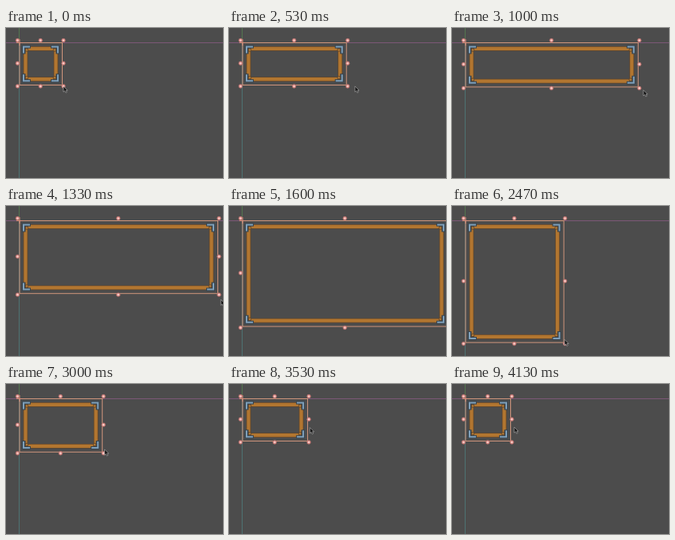
Write an HTML page that moves like this. It is 272 by 188 pixels and loops after 4270 ms.

```html
<!DOCTYPE html>
<html lang="en">
<head>
<meta charset="utf-8">
<title>Resizing a bordered panel</title>
<style>
html, body { margin: 0; width: 100%; height: 100%; overflow: hidden; background: #4c4c4c; }
svg { display: block; width: 100vw; height: 100vh; }
</style>
</head>
<body>
<svg viewBox="0 0 272 188">
  <defs>
    <g id="corner">
      <path d="M0 0H11V4H8L4.5 8V11H0Z" fill="#35434f"/>
      <path d="M1 1H10V3H3V10H1Z" fill="#7f9fb8"/>
      <path d="M4 4H8L4 8Z" fill="#6b4f35"/>
      <circle cx="6" cy="6" r="1.8" fill="#b07a38" stroke="#5a4029" stroke-width=".8"/>
    </g>
    <g id="handle">
      <circle r="2.4" fill="#e2918c" stroke="#a06260" stroke-width=".5"/>
      <circle r="1.1" fill="#f6d8d2"/>
    </g>
  </defs>
  <rect width="272" height="188" fill="#4c4c4c"/>
  <path d="M0 18.5H272" stroke="#7c5877"/>
  <path d="M16.5 0V18" stroke="#54754f"/>
  <path d="M16.5 18V188" stroke="#4e7273"/>
  <g fill="none">
    <rect class="band" x="24.5" y="25.8" rx="3.5" stroke="#62462a" stroke-width="5.8"/>
    <rect class="band" x="24.5" y="25.8" rx="3.5" stroke="#b27630" stroke-width="4.2"/>
  </g>
  <g id="corners"></g>
  <rect id="selection" x="17" y="18.5" fill="none" stroke="#d0957c"/>
  <path d="M13 18.5H21M17 14V22" stroke="#d98f7c"/>
  <g id="handles"></g>
  <path id="cursor" d="M0 0V7.2L1.7 5.7L2.9 8.2L4.3 7.5L3.1 5.2H5.2Z" fill="#161616" stroke="#b5b5b5" stroke-width=".6"/>
</svg>
<script>
const LOOP = 4270, STEP = 200 / 3, LAST_CHANGE = 4130, LEAD = 40;
const LEFT = 14.5, TOP = 15.5;

const $ = id => document.getElementById(id);
const ramp = (t, from, to) => Math.min(1, Math.max(0, (t - from) / (to - from)));
const easeOut = u => u * (2 - u);
const smooth = u => u * u * (3 - 2 * u);

function setAll(node, attributes) {
  for (const name in attributes) node.setAttribute(name, attributes[name]);
}

function place(node, x, y, flipX = 1, flipY = 1) {
  node.setAttribute("transform", `translate(${x} ${y}) scale(${flipX} ${flipY})`);
}

function copies(count, symbol, parent) {
  return Array.from({ length: count }, () => {
    const node = document.createElementNS("http://www.w3.org/2000/svg", "use");
    node.setAttribute("href", "#" + symbol);
    return parent.appendChild(node);
  });
}

const corners = copies(4, "corner", $("corners"));
const handles = copies(8, "handle", $("handles"));
const bands = document.querySelectorAll(".band");

// The picture advances 15 times a second, on 10 ms boundaries.
function steppedTime(t) {
  const edge = k => Math.round(k * STEP / 10) * 10;
  const k = Math.ceil(t / STEP);
  return Math.min(LAST_CHANGE, edge(k) <= t ? edge(k) : edge(k - 1));
}

// Widen, then heighten, then narrow, then flatten while still narrowing.
const rightAt = t => 72
  + 204 * easeOut(ramp(t, 240, 1620))
  - 135 * smooth(ramp(t, 1770, 2500))
  - 66 * ramp(t, 2550, 4130);

const bottomAt = t => 73
  + 114 * smooth(ramp(t, 905, 2000))
  - 114 * smooth(ramp(t, 2260, 3205));

// The pointer runs slightly ahead of the dragged handle and drifts up at the end.
const pointerAt = t => [
  rightAt(t + LEAD) + 3 * smooth(ramp(t, 2550, 3000)),
  bottomAt(t + LEAD) - 19 * smooth(ramp(t, 2950, 3600))
];

function draw(time) {
  const t = steppedTime(time % LOOP);
  const right = rightAt(t), bottom = bottomAt(t);

  setAll($("selection"), { width: right - 18.5, height: bottom - 20 });
  bands.forEach(band => setAll(band, { width: right - 34, height: bottom - 34.6 }));

  corners.forEach((corner, i) => {
    const far = i % 2, low = i > 1;
    place(corner, far ? right - 5 : 20, low ? bottom - 4.7 : 21.5, far ? -1 : 1, low ? -1 : 1);
  });

  // Walk a 3 by 3 grid, leaving out its centre.
  handles.forEach((handle, i) => {
    const cell = i < 4 ? i : i + 1;
    place(handle,
      LEFT + (right - LEFT) * (cell % 3) / 2,
      TOP + (bottom - TOP) * Math.floor(cell / 3) / 2);
  });

  place($("cursor"), ...pointerAt(t));
}

const start = performance.now();
function tick() {
  draw(performance.now() - start);
  requestAnimationFrame(tick);
}
tick();
</script>
</body>
</html>
```
